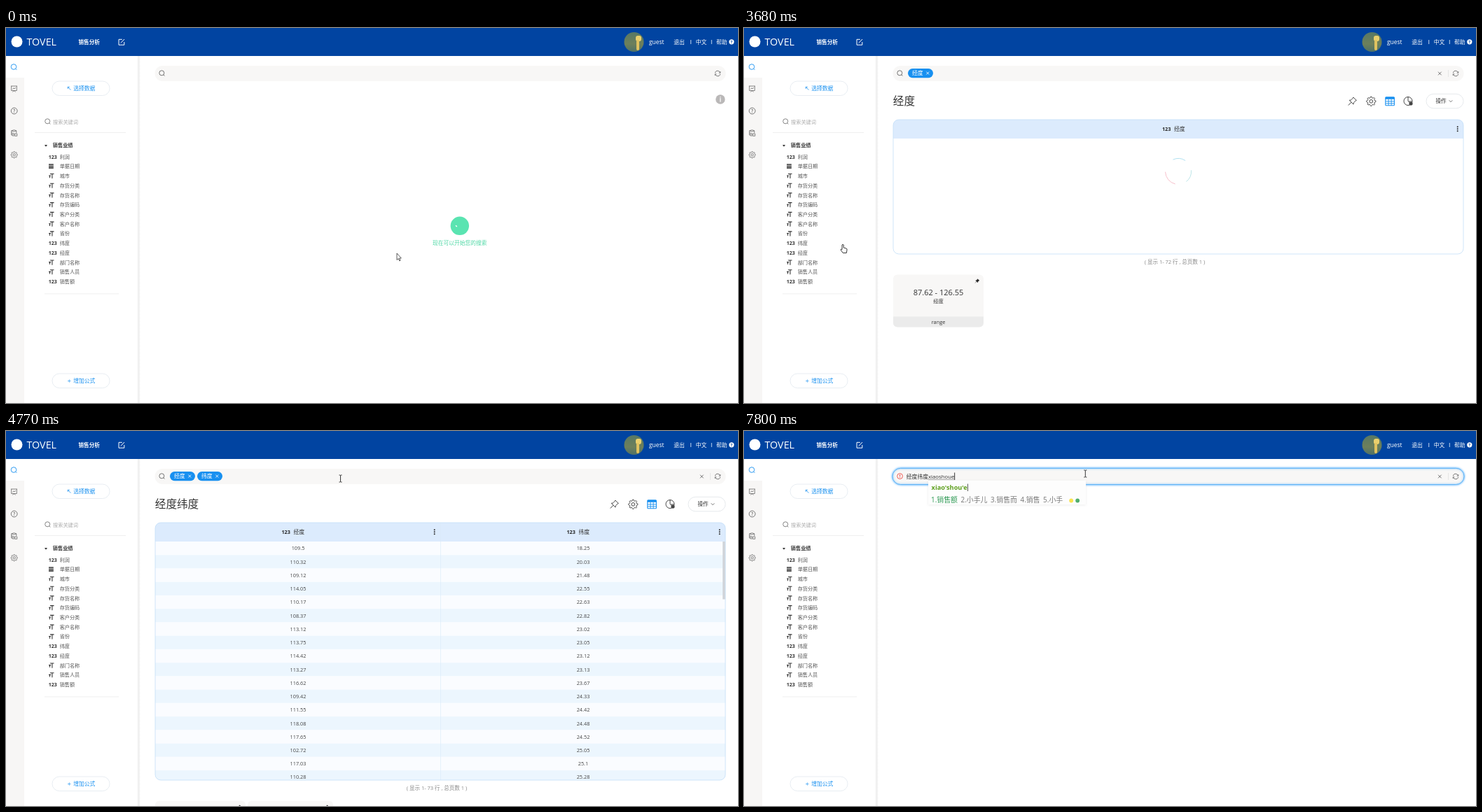
Write an HTML page with a canvas that moves like this. It is 1045 by 536 pixels and loops after 8 s.

```html
<!DOCTYPE html>
<html lang="zh-CN">
<head>
<meta charset="utf-8">
<style>
html, body { margin: 0; width: 100%; height: 100%; overflow: hidden; background: #fff; }
canvas { display: block; }
</style>
</head>
<body>
<canvas id="stage" width="1045" height="536"></canvas>
<script>
const ctx = document.getElementById('stage').getContext('2d');
const LOOP = 8000, STEP = 77, TAU = Math.PI * 2;
const FONT = '"Open Sans", "Noto Sans CJK SC", "Noto Sans CJK", sans-serif';
const INK = '#444', BLUE = '#1890f0', PALE = '#f8f7f6';

const clamp = v => Math.max(0, Math.min(1, v));
const smooth = v => v * v * (3 - 2 * v);

// y is the optical middle of the line
function text(s, x, y, size, color = INK, weight = 400, align = 'left') {
  ctx.font = `${weight} ${size}px ${FONT}`;
  ctx.textAlign = align;
  ctx.fillStyle = color;
  ctx.fillText(s, x, y + size * 0.37);
  return ctx.measureText(s).width;
}
function rect(x, y, w, h, color) {
  ctx.fillStyle = color;
  ctx.fillRect(x, y, w, h);
}
function box(x, y, w, h, r, fill, stroke, width = 1) {
  ctx.beginPath();
  ctx.roundRect(x, y, w, h, r);
  if (fill) { ctx.fillStyle = fill; ctx.fill(); }
  if (stroke) { ctx.strokeStyle = stroke; ctx.lineWidth = width; ctx.stroke(); }
}
function disc(x, y, r, color) {
  ctx.beginPath();
  ctx.arc(x, y, r, 0, TAU);
  ctx.fillStyle = color;
  ctx.fill();
}
function arc(x, y, r, color, width = 0.8, from = 0, to = TAU) {
  ctx.beginPath();
  ctx.arc(x, y, r, from, to);
  ctx.strokeStyle = color;
  ctx.lineWidth = width;
  ctx.stroke();
}
function shape(d, x, y, stroke, width = 0.8, fill) {
  const path = new Path2D(d);
  ctx.save();
  ctx.translate(x, y);
  if (fill) { ctx.fillStyle = fill; ctx.fill(path); }
  if (stroke) { ctx.strokeStyle = stroke; ctx.lineWidth = width; ctx.stroke(path); }
  ctx.restore();
}
function faded(alpha, draw) {
  ctx.save();
  ctx.globalAlpha *= alpha;
  draw();
  ctx.restore();
}

const cross = (x, y, r, color) => shape(`M${-r} ${-r}L${r} ${r}M${r} ${-r}L${-r} ${r}`, x, y, color, 0.9);
function lens(x, y, r, color) {
  arc(x, y, r, color, 0.9);
  shape(`M${r * 0.7} ${r * 0.7}l1.7 1.7`, x, y, color, 0.9);
}
function gear(x, y, r, color, width) {
  ctx.beginPath();
  for (let i = 0; i <= 64; i++) {
    const a = i / 64 * TAU, d = r * (0.9 + 0.13 * Math.tanh(3 * Math.cos(8 * a)));
    ctx.lineTo(x + d * Math.cos(a), y + d * Math.sin(a));
  }
  ctx.strokeStyle = color;
  ctx.lineWidth = width;
  ctx.stroke();
  arc(x, y, r * 0.36, color, width);
}
function kebab(x, y) {
  for (const d of [-3, 0, 3]) disc(x, y + d, 1, '#222');
}

function header() {
  rect(0, 0, 1045, 40, '#0144a1');
  disc(15.5, 19.5, 8, '#fff');
  text('TOVEL', 29.5, 19.5, 14.3, '#fff');
  text('销售分析', 103.5, 20, 7.6, '#fff', 600);
  shape('M1 -3.7H-3.8V4.2H4V0M-1 1.4L4.2 -4', 164.8, 20, '#fff', 1);
  const sky = ctx.createLinearGradient(0, 6, 0, 34);
  sky.addColorStop(0, '#587865');
  sky.addColorStop(0.6, '#6d805b');
  sky.addColorStop(1, '#4f7167');
  disc(896.5, 20, 14, sky);
  box(899, 11, 8, 8, 3, '#ead06d');
  box(900, 17, 4, 15, 2, '#dfc260');
  text('guest', 918, 19.5, 8.4, '#fff');
  text('退出', 953.2, 20, 7.8, '#fff');
  rect(977.3, 17, 0.9, 6, '#d8e4f5');
  text('中文', 984.8, 20, 7.8, '#fff');
  rect(1006.8, 17, 0.9, 6, '#d8e4f5');
  text('帮助', 1014, 20, 7.8, '#fff');
  disc(1035.8, 19.8, 3.6, '#fff');
  text('?', 1035.8, 19.8, 6, '#0144a1', 700, 'center');
}

function rail() {
  rect(0, 40, 26, 496, '#f7f6f5');
  rect(0, 40, 26, 31, '#fff');
  lens(11, 55.5, 3.8, BLUE);
  const c = '#666';
  shape('M-4.5 -4H4.5M-3.8 -4V2.5H3.8V-4M-2 4.5L0 2.5L2 4.5M-2 .5L-.5 -1.2L.7 0L2.2 -1.8', 11.5, 87, c);
  arc(11.7, 118.5, 4.4, c, 0.9);
  text('?', 11.7, 118.5, 6.5, c, 600, 'center');
  shape('M-4 -3.2Q0 -5.4 3 -3.2V0M-4 -3.2V3Q-2 4.6 0 4M-4 -3.2Q0 -1 3 -3.2M-4 -.4Q-2 1 0 .6M-4 1.5Q-2 2.8 0 2.4M.8 1H4V4.3H.8Z', 11.8, 150, c);
  gear(11.7, 181.3, 4.6, c, 0.8);
}

const FIELDS = ['#利润', '@单据日期', '城市', '存货分类', '存货名称', '存货编码', '客户分类',
  '客户名称', '省份', '#纬度', '#经度', '部门名称', '销售人员', '#销售额'];
const rowY = i => 184 + i * 13.73;

function sidebar(hover) {
  const edge = ctx.createLinearGradient(187, 0, 191.5, 0);
  edge.addColorStop(0, '#fff');
  edge.addColorStop(0.5, '#ededed');
  edge.addColorStop(1, '#fafafa');
  rect(187, 40, 4.5, 496, edge);

  box(66, 76, 82, 20.5, 10.2, '#fff', '#e3e9ef', 0.8);
  shape('M2.2 2.2L-2 -2M-2 .6V-2H.6', 90.2, 86.3, BLUE, 0.8);
  text('选择数据', 96.2, 86.3, 7.8, BLUE);
  box(66, 494, 82, 20.5, 10.2, '#fff', '#e3e9ef', 0.8);
  shape('M-2.3 0H2.3M0 -2.3V2.3', 90.3, 504.5, BLUE, 0.6);
  text('增加公式', 96.2, 504.3, 7.8, BLUE);

  lens(59.2, 133.3, 3.5, '#777');
  text('搜索关键词', 67, 134, 7.2, '#aaa');
  rect(41, 149, 130, 0.8, '#ececec');
  rect(55, 379.5, 106, 0.8, '#ececec');
  shape('M-2 -1H2L0 1.7Z', 57, 168, null, 0, '#333');
  text('销售业绩', 66.8, 167.8, 7.2, '#333', 700);

  FIELDS.forEach((field, i) => {
    const y = rowY(i), kind = field[0];
    if (i === hover) rect(54, y - 6.7, 107, 13.3, '#f4f4f4');
    if (kind === '#') text('123', 60.8, y + 0.2, 7, '#333', 700);
    else if (kind === '@') {
      rect(61, y - 3.5, 6.8, 6.8, '#555');
      rect(61, y - 1.7, 6.8, 0.6, '#fff');
      rect(61, y + 0.7, 6.8, 0.5, '#ccc');
    } else shape('M-1.6 -3H4M1.4 -3V3.6M-3.4 -.4H-.4M-2 -.4V2.8', 64.5, y, '#333', 1.1);
    text(field.replace(/[#@]/, ''), 76.7, y, 7.15, '#555');
  });
}

function handle() {
  box(26, 247, 11.3, 82.5, [0, 4, 4, 0], '#ebeaea');
  shape('M1.5 -3.5L-1.5 0L1.5 3.5', 33, 288, '#fff', 1.1);
}

function tooltip(row) {
  const y = rowY(row);
  box(164.7, y - 19.3, 113, 38.3, 4, '#1a1a1a');
  shape('M0 0L4 -3.5V3.5Z', 161, y, null, 0, '#1a1a1a');
  const name = FIELDS[row].slice(1);
  ['名称:' + name, '来源:销售业绩', '更新时间:2018-11-30 08:28:02']
    .forEach((line, i) => text(line, 179.3, y - 11 + i * 11, 7.1, '#fff'));
  shape('M-2.3 -3H1L2.4 -1.5V3H-2.3ZM-1 0H1M-1 1.4H1', 173, y - 11, '#ddd', 0.7);
  shape('M-1.5 2H-2Q-3.6 0 -1.8 -1Q0 -4 2 -1Q4 .5 2 2H1.5M0 0V3M-1 2L0 3L1 2', 173.2, y, '#ddd', 0.7);
  arc(173.2, y + 11, 2.9, '#ddd', 0.7);
  shape('M0 -1.8V.2H1.6', 173.2, y + 11, '#ddd', 0.7);
}

function searchBar({ words, pills, ring, error }) {
  box(212.5, 54, 815, 22, 11, PALE);
  if (ring) faded(ring, () => {
    ctx.shadowColor = '#40a9ff';
    ctx.shadowBlur = 3;
    box(212, 53.3, 816, 23.2, 11.6, PALE, '#62b4f5', 1);
  });
  if (error) {
    arc(222.6, 64.6, 3.9, '#f04b43', 0.9);
    rect(222.1, 62.2, 1, 3, '#f04b43');
    rect(222.1, 66, 1, 1, '#f04b43');
  } else lens(222.3, 64.3, 3.5, '#666');
  arc(1016, 65, 3.7, '#666', 0.9, 0.2, 2.8);
  arc(1016, 65, 3.7, '#666', 0.9, 3.34, 5.94);
  shape('M3.8 -3V-.8H1.7M-3.8 3V.8H-1.7', 1016, 65, '#666', 0.8);
  if (!words.length) return;
  cross(993.3, 65, 2.3, '#666');
  rect(1005, 60, 0.8, 10, '#e2e2e2');
  if (pills) words.forEach((word, i) => {
    const x = 234 + i * 39;
    box(x, 58, 36, 13.2, 6.6, BLUE);
    text(word, x + 6, 64.5, 7.8, '#fff');
    cross(x + 28.3, 64.5, 1.9, '#fff');
  });
  else text(words.join(''), 231.8, 65, 7.8, '#333');
}

function welcome(t, alpha) {
  faded(alpha, () => {
    disc(647.8, 282.8, 13.2, '#5ae4b1');
    const drawn = 2.5 + 17 * clamp((t - 10) / 360);
    ctx.setLineDash([drawn, 40]);
    shape('M0 0L4.2 4.2L12.5 -4', 642, 282.3, '#fff', 1.4);
    ctx.setLineDash([]);
    text('现在可以开始您的搜索', 647.8, 307.6, 7.75, '#4fd8a5', 400, 'center');
  });
}
function info(dark) {
  const shade = Math.round(186 - 144 * dark);
  disc(1019.8, 102, 6.7, `rgb(${shade},${shade - 2},${shade - 2})`);
  rect(1019.2, 98, 1.2, 1.3, '#fff');
  rect(1019.2, 100.1, 1.2, 5.6, '#fff');
}

const LON = [109.5, 110.32, 109.12, 114.05, 110.17, 108.37, 113.12, 113.75, 114.42, 113.27, 116.62,
  109.42, 111.55, 118.08, 117.65, 102.72, 117.03, 110.28];
const LAT = [18.25, 20.03, 21.48, 22.55, 22.63, 22.82, 23.02, 23.05, 23.12, 23.13, 23.67,
  24.33, 24.42, 24.48, 24.52, 25.05, 25.1, 25.28];
const pushpin = 'M1 -5.5L5.5 -1L4 -.2L1.6 2.2L1.2 4.6L-4.6 -1.2L-2.2 -1.6L.2 -4ZM-2 1.8L-6 6';

function toolbar(title) {
  text(title, 212.8, 104, 15.6, '#333');
  shape(pushpin, 868.8, 104.5, INK, 1);
  gear(895.3, 104.8, 6.5, INK, 1);
  box(915.8, 98.8, 12.6, 12, 1, '#fff', BLUE, 1.1);
  rect(915.8, 98.8, 12.6, 3, BLUE);
  shape('M-6 0H6M-6 3H6M-2 -3V6M2 -3V6', 922.1, 104.8, BLUE, 0.9);
  arc(948, 104.5, 6, INK, 1);
  shape('M0 -6V0L4.5 4M1 .5H6', 948, 104.5, INK, 1);
  disc(952, 108, 2.6, INK);
  box(974, 94.3, 53, 20.5, 10.2, '#fff', '#e0e4e8', 0.8);
  text('操作', 987.5, 104.3, 7.6, '#333');
  shape('M-2.3 -1.2L0 1.2L2.3 -1.2', 1009, 104.5, '#555', 0.8);
}

function card(x, y, w, name, range) {
  box(x, y, w, 75, 6, PALE);
  box(x, y + 60, w, 15, [0, 0, 6, 6], '#ebebeb');
  const mid = x + w / 2;
  text(range, mid, y + 25, 11, '#333', 400, 'center');
  text(name, mid, y + 37.5, 7.3, '#333', 400, 'center');
  text('range', mid, y + 67.5, 7.3, '#333', 400, 'center');
  ctx.save();
  ctx.translate(x + w - 9, y + 9);
  ctx.scale(0.5, 0.5);
  shape(pushpin, 0, 0, '#222', 1, '#222');
  ctx.restore();
}

function results(t, words, loaded) {
  toolbar(words.join(''));
  const bottom = loaded ? 499 : 323, cols = words.length, colW = 814 / cols;
  ctx.save();
  ctx.beginPath();
  ctx.roundRect(213, 131, 814, bottom - 131, 8);
  ctx.clip();
  rect(213, 131, 814, 27, '#dcebfd');
  if (loaded) LON.forEach((_, i) => rect(213, 158 + i * 19.24, 814, 19.24, i % 2 ? '#ecf6fe' : '#fafcff'));
  words.forEach((word, c) => {
    const left = 213 + c * colW, mid = left + colW / 2;
    text('123', mid - 23, 144, 7.2, '#222', 700);
    text(word, mid - 6, 144, 7.8, '#333');
    kebab(left + colW - 8.3, 144.3);
    if (c) rect(left, 131, 0.6, bottom - 131, '#d9e9f8');
    if (loaded) (c ? LAT : LON).forEach((v, i) =>
      text(String(v), mid + (cols > 1 ? 0.5 : 0), 167.7 + i * 19.24, 7.3, INK, 400, 'center'));
  });
  if (loaded) rect(1023, 158, 4, 82.5, '#d2d6db');
  ctx.restore();
  box(213, 131, 814, bottom - 131, 8, null, '#c3dff8', 0.8);

  if (!loaded) {
    const spin = (t - 3680) / 1000 * TAU;
    arc(620, 205, 18.5, '#a9def0', 0.9, spin - 2, spin - 1);
    arc(620, 205, 18.5, '#b5e3e6', 0.9, spin - 0.1, spin + 0.9);
    arc(620, 205, 18.5, '#f7b9c6', 0.9, spin + 1.8, spin + 3.1);
  }
  text(`( 显示 1- ${71 + cols} 行 , 总页数 1 )`, 615, bottom + 11, 7.5, '#888', 400, 'center');
  const top = bottom + 29.5;
  card(213, top, 129, '经度', '87.62 - 126.55');
  if (cols > 1) card(345, top, 122, '纬度', '18.25 - 50.25');
}

function suggestions(alpha) {
  faded(alpha, () => {
    box(257.3, 76, 241, 63.3, [0, 0, 4, 4], PALE);
    rect(271, 118, 220, 0.6, '#eeedec');
    rect(271, 96.8, 220, 0.6, '#eeedec');
    text('+ -symbol', 271, 86.4, 7.3, '#333');
    text('按 单据日期 计算的 纬度 的标准差 的月增长率 同比上一年 -系统提示.', 270.7, 107.5, 7.1, '#333');
    text('在 ( 单据日期 ) 之前的 -系统提示.', 270.7, 129, 7.1, '#333');
  });
}

const KEYS = [
  [6310, 'x', '下 想 小 新 先'],
  [6480, 'xi', '系 西 洗 喜 细'],
  [6630, 'xia', '下 夏 吓 瞎 虾'],
  [6780, 'xiao', '小 笑 校 消 效'],
  [6950, "xiao's", '小时候 消散 小说 小事 小孙'],
  [7100, "xiao'sh", '小时候 小说 消失 小事 销售'],
  [7270, "xiao'sho", '销售 小手 小受 消瘦 小兽'],
  [7340, "xiao'shou", '销售 小手 小受 消瘦 小兽'],
  [7570, "xiao'shou'e", '销售额 小手儿 销售而 销售 小手'],
];

function typing(t) {
  const key = KEYS.filter(k => t >= k[0]).pop();
  let caret = 263;
  if (key) {
    const [, pinyin, choices] = key;
    const w = text(pinyin.replace(/'/g, ''), 263, 65, 7.75, '#333');
    rect(263, 69.3, w, 0.6, '#777');
    caret += w;
    ctx.font = `400 9.9px ${FONT}`;
    const items = choices.split(' ').map((s, i) => `${i + 1}.${s}`);
    const end = items.reduce((x, s) => x + ctx.measureText(s).width + 4.6, 267) - 4.6;
    ctx.save();
    ctx.shadowColor = 'rgba(0,0,0,.12)';
    ctx.shadowBlur = 3;
    rect(263, 70.5, end + 33 - 263, 35, '#fdfdfd');
    ctx.restore();
    const pw = text(pinyin, 267.6, 80.5, 9.2, '#5d9f1d', 700);
    rect(268 + pw, 75.5, 0.8, 10.5, '#333');
    let x = 267;
    items.forEach((s, i) => { x += text(s, x, 98.8, 9.9, i ? '#777' : '#2f9a55') + 4.6; });
    disc(end + 12, 99.5, 2.9, '#f8e44f');
    disc(end + 21, 99.5, 2.9, '#4fae6c');
  }
  rect(caret, 59.5, 0.9, 10.5, '#222');
}

// time, x, y of the pointer's hot spot
const TRACK = [[823, 558, 322], [1670, 172, 321], [1900, 162, 321], [2143, 162, 321], [2380, 141.5, 317],
  [2910, 141.5, 317], [3670, 141.5, 309.5], [4060, 141.5, 309.5], [4827, 487.3, 61]];

function pointer(t) {
  const q = 900 + Math.floor((t - 900) / STEP) * STEP;
  const next = TRACK.findIndex(k => k[0] > q);
  if (next === 0) return TRACK[0].slice(1);
  if (next < 0) return TRACK[TRACK.length - 1].slice(1);
  const [a, b] = [TRACK[next - 1], TRACK[next]];
  const p = smooth((q - a[0]) / (b[0] - a[0]));
  return [a[1] + (b[1] - a[1]) * p, a[2] + (b[2] - a[2]) * p];
}
function cursor(t) {
  const [x, y] = pointer(t);
  if (t > 4070 && y < 76) {
    shape('M-2 -5H-.5L0 -4.5L.5 -5H2M0 -4.5V4.5M-2 5H-.5L0 4.5L.5 5H2', x, y, '#222', 0.9);
  } else if (t > 2300 && x < 165) {
    shape('M-1.5 .5Q-.4 -.9 .7 .5V4.5L4.6 5.6Q5.8 6 5.5 7.6L4.8 12H-.3L-3.6 7.4Q-3 5.9 -1.5 7Z', x, y, '#222', 0.9, '#fff');
  } else {
    shape('M0 0V9.5L2.2 7.6L3.7 10.9L5 10.3L3.6 7H6.3Z', x, y, '#333', 0.8, '#fff');
  }
}

function draw(t) {
  const between = (a, b) => t >= a && t < b;
  const fade = clamp((Math.floor((t - 1750) / 75) + 1) / 3);
  const words = t < 2760 ? [] : t < 3840 ? ['经度'] : ['经度', '纬度'];
  const pills = between(3140, 3840) || between(4230, 4920);
  const ring = between(2760, 2910) || between(3840, 4070) ? 1
    : t < 4920 ? 0 : clamp((Math.floor((t - 4920) / 76) + 1) / 4);
  const hover = between(2380, 3140) ? 10 : between(3770, 4230) ? 9 : -1;

  rect(0, 0, 1045, 536, '#fff');
  header();
  rail();
  sidebar(hover);
  searchBar({ words, pills, ring, error: t >= 7800 });

  if (t < 1900) welcome(t, 1 - fade);
  if (t < 2910) info(fade);
  if (between(3140, 4070)) results(t, ['经度'], t >= 3770);
  if (between(4230, 7650)) results(t, words, t >= 4690);
  if (between(1590, 3140) || between(3770, 4230)) handle();
  if (hover >= 0) tooltip(hover);
  if (between(5530, 7650)) suggestions(t < 5610 ? 0.5 : 1);
  if (t >= 6160) typing(t);
  cursor(t);
}

function frame() {
  draw(performance.now() % LOOP);
  requestAnimationFrame(frame);
}
frame();
</script>
</body>
</html>
```
